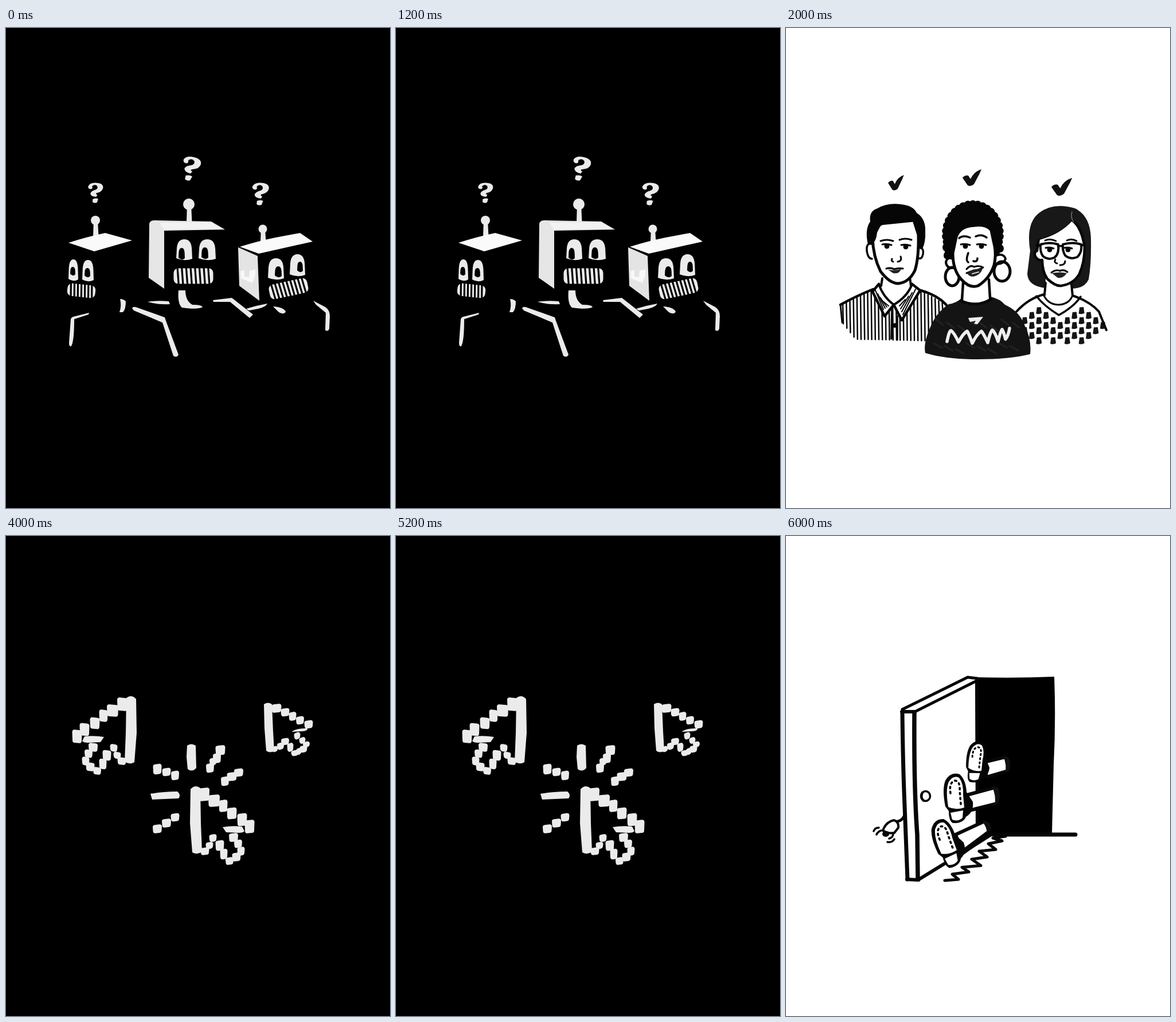
An HTML page that plays this animation: 670 px wide and 836 px high, repeating every 8000 ms.

```html
<!DOCTYPE html>
<html lang="en">
<head>
<meta charset="utf-8">
<title>Robots, people, cursors, door</title>
<style>
  html, body { margin: 0; width: 100%; height: 100%; overflow: hidden; background: #000; }
  svg { display: block; width: 100%; height: 100%; }
</style>
</head>
<body>
<svg id="stage" viewBox="0 0 670 836"></svg>
<script>
const NS = 'http://www.w3.org/2000/svg';
const stage = document.getElementById('stage');
const CHALK = '#ebebeb', INK = '#060606', HOLD = 2000;
let layer = stage;

function add(tag, attrs, parent = layer) {
  const el = document.createElementNS(NS, tag);
  for (const key in attrs) el.setAttribute(key, attrs[key]);
  return parent.appendChild(el);
}
const fill = (d, color) => add('path', { d, fill: color });
const line = (d, width, color = INK, inside = 'none') => add('path', {
  d, fill: inside, stroke: color, 'stroke-width': width,
  'stroke-linecap': 'round', 'stroke-linejoin': 'round'
});
const oval = (cx, cy, rx, ry, color) => add('ellipse', { cx, cy, rx, ry, fill: color });
const ring = (cx, cy, rx, ry, width) => add('ellipse', {
  cx, cy, rx, ry, fill: 'none', stroke: INK, 'stroke-width': width
});

function group(transform, draw) {
  const outer = layer;
  layer = add('g', { transform });
  draw();
  layer = outer;
}

function scene(background, draw) {
  layer = add('g', { visibility: 'hidden' }, stage);
  add('rect', { width: 670, height: 836, fill: background });
  draw();
  const made = layer;
  layer = stage;
  return made;
}

// ---- Robots ----
function dome(x, y, w, h, color) {
  fill(`M${x} ${y + h - 3} L${x + w * 0.04} ${y + h * 0.4} Q${x + w * 0.1} ${y} ${x + w * 0.5} ${y}
    Q${x + w * 0.93} ${y} ${x + w * 0.97} ${y + h * 0.45} L${x + w} ${y + h - 2} Q${x + w / 2} ${y + h + 3} ${x} ${y + h - 3}Z`, color);
}

function eye(x, y, w, h, px, py, pw, ph) {
  dome(x, y, w, h, CHALK);
  dome(px, py, pw, ph, '#000');
}

function mouth(cx, cy, w, h, teeth, tilt) {
  group(`translate(${cx} ${cy}) rotate(${tilt})`, () => {
    add('rect', { x: -w / 2, y: -h / 2, width: w, height: h, rx: 8, fill: CHALK });
    for (let i = 1; i < teeth; i++) {
      const x = -w / 2 + w * i / teeth;
      line(`M${x - 1} ${-h / 2} L${x + 1} ${h / 2}`, 3.2, '#000');
    }
  });
}

function question(x, y, size, tilt) {
  group(`translate(${x} ${y}) rotate(${tilt}) scale(${size})`, () => {
    fill(`M-15 -12 Q-12 -20 1 -20 Q15 -20 15 -11 Q14 -3 4 0 Q-2 2 4 4 L2 8
      Q-9 8 -10 2 Q-9 -3 0 -6 Q6 -9 3 -14 Q-2 -18 -7 -13 Q-5 -7 -10 -7 Q-15 -7 -15 -12Z`, CHALK);
    fill('M-5 13 Q1 10 6 12 L4 19 Q-1 22 -5 19Z', CHALK);
  });
}

function antenna(x, y, r, foot) {
  oval(x, y, r, r, CHALK);
  fill(`M${x - 3} ${y} L${x + 4} ${y} L${x + 5.5} ${foot} L${x - 4} ${foot}Z`, CHALK);
}

const robots = scene('#000', () => {
  question(156, 287, 0.87, 2);
  antenna(156, 335, 8, 363);
  fill('M109 374 Q140 364 173 357 L220 370 L154 389Z', '#fafafa');
  eye(109, 403, 17, 37, 112, 416, 9, 15);
  eye(133, 404, 20, 37, 137, 418, 10, 16);
  mouth(131.5, 457.5, 49, 22, 8, 6);
  fill('M199 472 Q205 472 209 476 Q209 490 204 495 L198 495 Q202 484 199 472Z', CHALK);
  fill('M145 496 L144 499 L119 507 Q119 545 114 554 Q110 556 110 548 L113 507 Q114 503 121 502Z', CHALK);
  fill('M220 488 Q222 484 229 487 L277 504 L279 510 L301 569 Q298 575 292 571 L273 513 L223 492Z', CHALK);

  question(322, 245, 1.04, 14);
  antenna(319, 307, 10, 338);
  fill('M250 341 Q251 335 259 335 L358 337 L382 351 L276 353 L276 454 L249 435Z', '#e6e6e6');
  fill('M268 339 L356 338 L379 350 L275 351Z', '#f2f2f2');
  eye(297, 368, 28, 36, 301, 383, 11, 20);
  eye(336, 368, 30, 36, 341, 382, 12, 20);
  mouth(327, 432, 69, 27, 9, 0);
  fill('M301 457 L313 457 Q313 475 325 482 Q341 482 343 486 Q335 491 307 487 Q299 480 301 457Z', CHALK);
  fill('M247 477 Q264 474 284 476 L286 481 Q266 482 247 477Z', CHALK);
  fill('M361 474 L394 470 L431 499 L425 505 L391 477 L362 477Z', CHALK);

  question(443.5, 289, 0.97, 4);
  antenna(448, 350, 7.5, 372);
  fill('M408 381 Q440 371 470 365 L513 357 L535 372 L441 393Z', '#fafafa');
  fill('M405 382 L439 397 L442 475 L407 449Z', '#e4e4e4');
  fill('M409 424 L416 421 L416 433 L424 434 L425 423 L435 420 L435 430 L430 444 L410 436Z', '#f8f8f8');
  eye(457, 401, 28, 37, 469, 415, 12, 19);
  eye(495, 394, 27, 38, 508, 407, 10, 18);
  mouth(493, 454, 68, 26, 10, -12);
  fill('M466 485 Q484 486 488 494 Q485 500 476 495Z', CHALK);
  fill('M419 489 Q438 483 456 480 Q453 486 440 489 L424 492Z', CHALK);
  fill('M536 475 L557 486 Q565 491 565 502 L564 524 Q561 530 557 526 L558 496 L541 482Z', CHALK);
});

// ---- People ----
const tick = (x, y, sx, sy) => group(`translate(${x} ${y}) scale(${sx} ${sy})`, () =>
  fill('M0 15 Q4 10 10 11 L14 17 Q20 4 33 0 L30 7 L20 26 Q14 31 9 28Z', '#111'));

// Lowered lid with the pupil hanging from it
function gaze(x, y, w = 16) {
  line(`M${x - w / 2} ${y - 2} Q${x} ${y - 4} ${x + w / 2} ${y - 1}`, 3);
  oval(x, y + 1, 4.5, 4.5, INK);
}

function man() {
  // shirt
  for (let x = 99; x < 276; x += 6.2) {
    const top = x < 152 ? 481 - (x - 95) * 0.44 : x > 235 ? 457 + (x - 235) * 0.58 : 458;
    const end = x < 122 ? 515 + (x - 99) * 1.25 : x > 244 ? 545 - (x - 238) * 1.45 : 544 + 2 * Math.sin(x);
    line(`M${x} ${top} L${x + 1} ${end}`, 2.5);
  }
  line('M95 482 Q122 467 152 455 M235 457 Q267 466 283 486', 4.5);
  line('M95 482 L98 513', 3);
  fill('M166 440 L163 447 L188 482 L222 447 L216 436Z', '#fff');
  line('M162 446 L151 459 L172 502 L188 482 L202 509 L234 457 L220 446', 4.5, INK, '#fff');
  line('M162 446 Q169 468 188 482 Q212 468 220 446 M168 436 L166 449 M216 434 L218 449', 4);
  for (let i = 0; i < 4; i++) {
    line(`M${156 + i * 4} ${457 + i * 6} L${170 + i * 3} ${490 - i * 2} M${226 - i * 6} ${455 + i * 6} L${204 - i * 2} ${499 - i * 5}`, 2);
  }
  line('M185 488 L184 541 M194 502 L194 543', 3.5);
  oval(190, 518, 4, 4, INK);
  // head
  line('M149 376 Q140 374 141 388 Q143 402 150 402 M234 383 Q241 384 239 394 Q237 403 232 401', 3.5, INK, '#fff');
  line('M151 366 Q152 398 165 424 Q181 445 196 445 Q215 443 225 422 Q232 400 231 360 L223 335 L164 341Z', 5, INK, '#fff');
  fill(`M143 377 Q137 351 147 337 Q144 319 160 314 Q177 304 200 307 Q222 309 228 322
    Q244 332 243 354 Q244 372 238 385 L230 382 Q231 355 222 335 Q207 338 184 338
    Q163 342 159 352 Q159 366 153 374Z`, INK);
  line('M165 371 Q176 367 187 371 M198 369 Q208 365 219 369', 3);
  gaze(176, 379);
  gaze(209, 380);
  line('M200 398 Q203 406 195 407 M185 402 Q183 406 187 407', 3);
  line('M175 419 Q182 417 189 420 Q197 418 204 419', 3.2);
  fill('M178 421 Q190 423 201 420 Q197 429 187 427Z', '#222');
}

function bumps(x0, y0, rx, ry) {
  for (let a = 165; a <= 375; a += 10.5) {
    const t = a * Math.PI / 180;
    oval(x0 + rx * Math.cos(t), y0 + ry * Math.sin(t), 7, 7, INK);
  }
}

function womanWithRings() {
  fill(`M243 566 Q239 548 254 516 Q264 494 284 481 Q298 479 308 469 L357 468 Q374 472 382 482
    Q407 493 416 517 Q429 543 426 568 Q390 577 335 577 Q280 577 243 566Z`, '#141414');
  for (let i = 0; i < 8; i++) {
    line(`M${262 + i * 19} ${508 + i % 3 * 5} l12 9 m-16 32 l14 8`, 3, '#222');
  }
  line(`M281 546 Q285 526 288 527 Q293 530 301 547 Q309 532 316 528 Q319 532 325 549 Q333 533 341 528
    Q345 533 352 548 Q356 530 360 526 Q365 530 370 546 Q375 526 377 525 Q380 530 383 542 Q388 536 390 523`, 5.5, '#eee');
  fill('M318 505 L344 503 L334 516 L328 515 L331 510 L321 512Z', '#eee');
  fill('M309 436 L307 474 Q332 486 356 472 L354 430Z', '#fff');
  line('M309 444 L307 474 M354 438 L356 470', 4.5);
  line('M305 475 Q333 488 358 472', 5);
  bumps(326, 359, 47, 52);
  fill('M280 400 Q268 365 284 328 Q302 304 328 306 Q360 308 374 340 Q379 372 371 400Z', INK);
  oval(279, 382, 6, 7, INK);
  oval(281, 396, 6, 7, INK);
  oval(374, 384, 6, 7, INK);
  line('M291 402 Q281 398 279 408 Q280 418 290 418 M367 396 Q380 392 383 402 Q380 412 366 411', 4, INK, '#fff');
  ring(290, 433, 12, 16, 5);
  ring(377, 424, 14, 17, 5);
  line(`M291 392 Q291 422 306 438 Q320 454 335 449 Q355 437 363 413 Q367 396 364 380
    Q360 362 358 352 Q349 341 328 344 Q303 345 297 364 Q294 378 291 392Z`, 5, INK, '#fff');
  line('M302 366 Q309 360 321 365 M331 363 Q341 358 350 365', 3.5);
  gaze(313, 379);
  gaze(341, 379);
  line('M318 392 Q313 405 318 408 M327 406 Q334 408 334 401', 3.5);
  line('M315 420 Q322 412 328 416 Q338 413 344 417 Q337 421 328 422 Q320 425 315 427', 3);
  fill('M316 427 Q325 420 343 419 Q340 430 327 433 Q319 433 316 427Z', '#222');
  line('M325 428 L336 425', 1.8, '#fff');
}

function womanWithGlasses() {
  for (let col = 0; col < 12; col++) {
    for (let row = 0; row < 5; row++) {
      const x = 416 + col * 12.4, y = 475 + row * 17.5 + col % 2 * 8.5;
      const side = Math.abs(x - 476);
      const above = 470 + side * 0.36 + Math.max(0, side - 58) * 0.9;
      const neck = 504 - side * 0.75;
      const below = 550 - Math.max(0, 428 - x) * 1.5 - Math.max(0, x - 528) * 0.9;
      if (y < above + 3 || y < neck + 4 || y > below) continue;
      fill(`M${x - 3} ${y - 6} L${x + 4} ${y - 6.5} L${x + 5.5} ${y + 4} Q${x + 1} ${y + 7} ${x - 4.5} ${y + 5}Z`, '#151515');
    }
  }
  line('M450 464 Q423 471 402 494 M500 466 Q530 476 546 494 L559 526', 4);
  fill(`M426 388 Q418 340 442 322 Q466 303 504 314 Q531 327 532 366 Q533 410 528 438
    Q521 454 497 454 L454 453 Q422 450 421 428Z`, '#181818');
  fill('M453 436 L452 468 Q475 488 499 468 L498 436Z', '#fff');
  line('M453 444 L451 465 M498 446 L500 466', 4);
  line('M450 466 Q458 482 476 482 Q493 481 499 468', 3);
  line('M437 467 Q450 484 476 500 Q503 485 514 468', 3.5);
  line(`M438 388 Q432 390 435 398 Q440 406 447 404 Q447 424 456 437 Q470 450 480 449
    Q502 446 512 428 Q521 408 521 382 Q516 346 498 334 Q478 357 441 367Z`, 4.5, INK, '#fff');
  fill('M427 372 Q420 336 446 319 Q470 306 499 314 L499 335 Q481 357 437 369Z', '#181818');
  line('M499 320 Q496 330 502 338', 1.2, '#888');
  line('M452 370 Q461 366 471 371 M490 370 Q499 366 507 371', 2.8);
  line('M444 377 Q460 372 475 377 Q477 394 468 400 Q457 405 448 397 Q443 390 444 377Z', 4);
  line('M483 377 Q500 372 515 377 Q517 391 508 399 Q496 404 487 396 Q482 388 483 377Z', 4);
  line('M475 381 Q479 378 483 381 M444 380 L437 378 M515 379 L521 377', 3.5);
  gaze(460, 385, 14);
  gaze(492, 385, 14);
  line('M470 403 Q467 409 473 410 M478 413 Q487 413 487 406', 3);
  line('M463 426 Q471 420 478 423 Q485 420 491 425', 3);
  fill('M464 427 Q478 424 490 427 Q483 437 474 435Z', '#222');
}

const people = scene('#fff', () => {
  tick(178, 256, 0.84, 0.92);
  tick(308, 246, 1, 1);
  tick(463, 261, 1.1, 1.07);
  man();
  womanWithGlasses();
  womanWithRings();
});

// ---- Cursors ----
function pixel(x, y, w, h = w) {
  const a = w / 2 - 4, b = h / 2 - 4;
  line(`M${x - a} ${y - b + 0.7} L${x + a} ${y - b - 0.3} L${x + a - 0.5} ${y + b - 0.5} L${x - a + 0.5} ${y + b + 0.3}Z`, 8, CHALK, CHALK);
}
const pixels = list => list.forEach(p => pixel(...p));

function bigCursor() {
  fill('M322 441 Q330 432 339 439 L340 500 L342 550 Q334 556 325 551 L321 500Z', CHALK);
  pixels([[346, 450, 18, 23], [363, 461, 20, 21], [379, 470, 15, 21], [394, 483, 17, 20], [412, 494, 17, 22], [425, 506, 17, 23]]);
  fill('M378 507 Q395 504 412 506 L416 514 Q414 517 406 517 L384 516Z', CHALK);
  pixels([[397, 525, 16, 15], [405, 536, 14], [410, 549, 13, 15], [402, 559, 15], [390, 566, 14, 13],
    [380, 554, 13, 18], [373, 539, 15, 18], [361, 526, 13, 13], [355, 539, 13, 12], [347, 549, 15, 13]]);
}

const cursors = scene('#000', () => {
  bigCursor();
  group('translate(549 -157) scale(-1 1)', bigCursor);

  fill('M450 293 Q457 288 464 293 L466 340 L468 374 Q461 379 454 374 L451 335Z', CHALK);
  pixels([[472, 300, 17, 15], [487, 307, 15, 14], [500, 314, 13, 15], [513, 321, 14, 14], [528, 328, 15, 14],
    [508, 348, 11, 12], [517, 356, 11, 11], [524, 363, 12, 10], [519, 371, 13, 12], [504, 378, 13, 10], [511, 375, 10, 11],
    [496, 368, 11, 15], [487, 358, 14, 12], [479, 366, 12, 12], [469, 371, 11, 10]]);
  fill('M498 341 Q508 334 526 335 Q527 339 518 340Z', CHALK);

  fill('M316 365 Q323 360 331 365 L332 404 Q325 412 317 406 L315 385Z', CHALK);
  fill('M252 449 Q275 445 299 445 Q306 451 301 457 L255 459Z', CHALK);
  pixels([[264, 406, 15, 18], [280, 411, 15, 14], [295, 417, 14, 16], [264, 510, 16, 15], [280, 500, 16, 15], [295, 490, 15, 14],
    [374, 373, 17, 17], [368, 387, 14, 17], [361, 393, 12, 13], [356, 404, 14, 16],
    [382, 427, 14, 16], [394, 419, 17, 15], [406, 412, 16, 14]]);
});

// ---- Door ----
function shoe(x, y, tilt, size) {
  group(`translate(${x} ${y}) rotate(${tilt}) scale(${size}) translate(-298 -455)`, () => {
    fill(`M278 470 Q272 440 278 425 Q287 409 303 414 Q314 424 315 445 L326 462 Q328 480 314 488
      Q309 500 291 499 Q284 495 284 478Z`, INK);
    fill('M283 470 Q278 441 284 427 Q292 415 302 420 Q310 430 309 450 L311 472 Q296 477 283 471Z', '#fff');
    fill('M287 481 L309 477 L308 490 Q300 497 290 493Z', '#fff');
    line('M287 447 Q284 428 295 425 Q304 426 303 442 L305 466', 3.6).setAttribute('stroke-dasharray', '2.5 6');
  });
}

const door = scene('#fff', () => {
  fill('M330 246 Q400 248 468 245 Q471 320 467 400 L464 519 L380 522 L331 524Z', '#000');
  line('M362 520 L505 520', 7);
  // panel
  line('M203 302 L317 246 L333 248 M225 306 L331 253', 5);
  line('M333 248 L334 500', 5);
  line('M202 306 L225 306 M211 598 L231 599', 6);
  line('M203 307 Q204 400 207 470 L212 598', 7);
  line('M224 307 Q223 440 229 520 L230 598', 7.5);
  line('M232 598 L276 571 M304 554 L358 520', 6);
  ring(243.5, 453, 8, 8.5, 3.5);
  line('M238 447 Q234 455 240 461', 4);
  // ringing bell
  line('M206 488 Q202 496 195 497', 5);
  line('M169 513 Q174 498 188 495 Q197 497 196 508 L189 517 Q178 519 169 513Z', 4, INK, '#fff');
  oval(174, 519, 6, 5, INK);
  line('M153 514 Q155 508 162 508 M158 520 Q160 515 166 513 M180 527 Q187 525 187 518 M177 533 Q186 534 189 528', 3.5);
  // legs
  line('M345 394 L382 385 Q389 387 388 409 L350 420Z', 6, INK, '#fff');
  fill('M379 384 Q391 383 391 397 Q391 411 382 413 Q386 399 379 384Z', '#111');
  shoe(333, 393, 11, 0.84);
  line('M316 451 L364 438 Q371 443 368 466 L320 478Z', 6, INK, '#fff');
  fill('M360 438 Q373 434 373 450 Q373 466 364 469 Q367 452 360 438Z', '#111');
  shoe(298, 456, 0, 1);
  line('M296 520 L346 497 Q357 504 354 515 L307 550Z', 6, INK, '#fff');
  fill('M342 497 Q356 494 358 507 Q358 518 350 521 Q352 508 342 497Z', '#111');
  shoe(281, 534, -15, 1);
  line('M306 553 L356 517', 8);
  // shadow
  line('M277 600 L301 598 L290 589 L319 585 L307 577 L340 574 L324 563 L351 559 L337 549 L366 546 L353 536 L377 531 L361 526 L383 523', 5);
});

const scenes = [robots, people, cursors, door];

function render(time) {
  const now = Math.floor(time / HOLD) % scenes.length;
  scenes.forEach((s, i) => s.setAttribute('visibility', i === now ? 'visible' : 'hidden'));
}

let start = null;
function loop(t) {
  if (start === null) start = t;
  render(Math.max(0, t - start));
  requestAnimationFrame(loop);
}
render(0);
requestAnimationFrame(loop);
</script>
</body>
</html>
```
